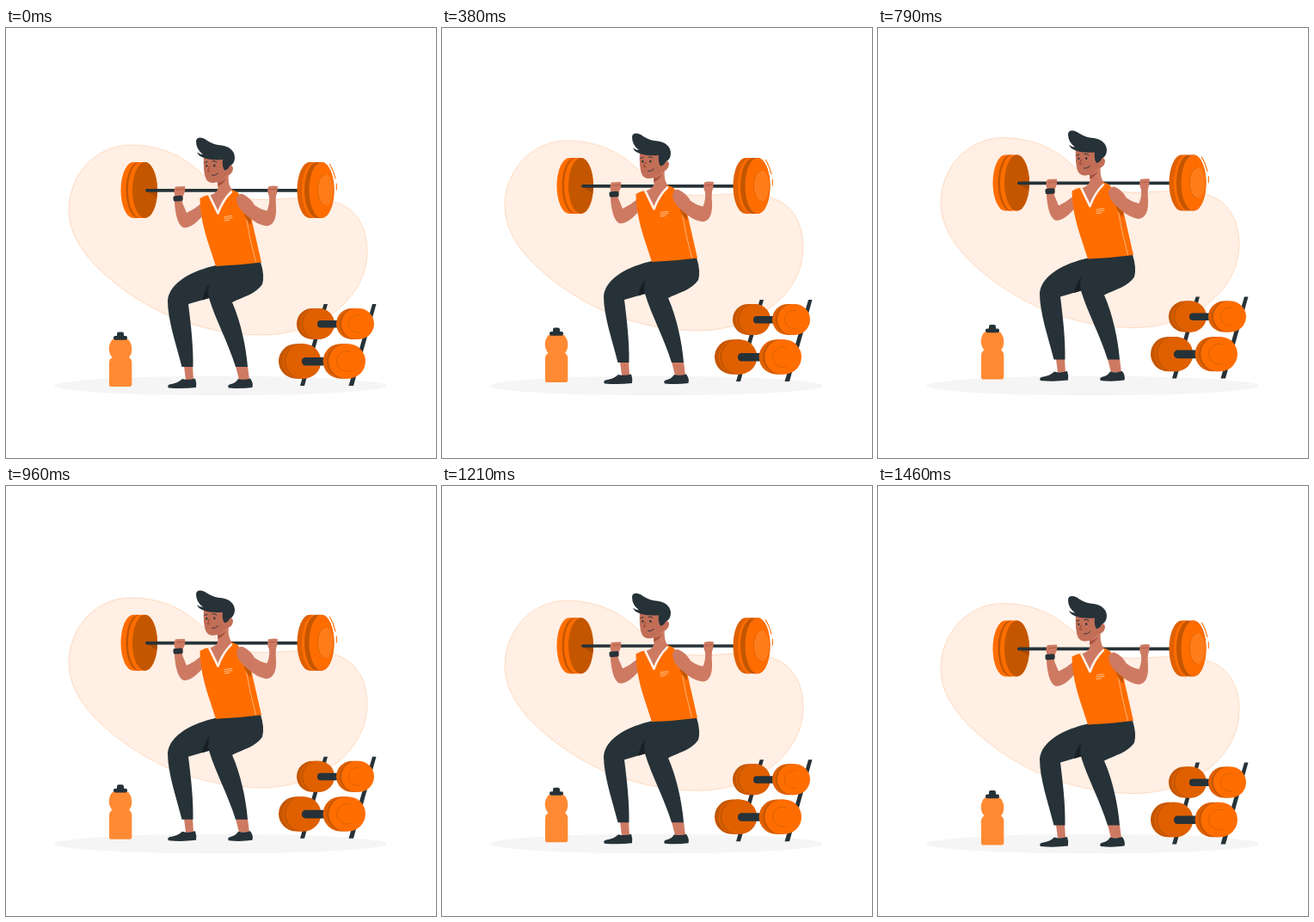
Write an HTML page that moves like this. It is 500 px wide and 500 px high and loops after 1500 ms.

```html
<!DOCTYPE html>
<html lang="en">
<head>
<meta charset="utf-8">
<title>Squat</title>
<style>
  html, body { margin: 0; height: 100%; overflow: hidden; background: #fff; }
  svg { display: block; width: 100%; height: 100%; }
  .dark { fill: #263238; }
  .orange { fill: #ff6d00; }
  .rim { fill: #e06000; }
  .shade { fill: #c45600; }
  .skin { fill: #ce7a63; }
  .line { fill: none; stroke-linecap: round; stroke-linejoin: round; }
</style>
</head>
<body>
<svg viewBox="0 0 500 500">
  <defs>
    <g id="dumbbell">
      <rect class="shade" width="37" height="36" rx="18"/>
      <rect class="rim" x="4" width="37" height="36" rx="18"/>
      <rect class="shade" x="5.500" width="37" height="36" rx="18"/>
      <rect class="rim" x="7.500" width="36.500" height="36" rx="18"/>
      <rect class="dark" x="24" y="14" width="28" height="8.500" rx="4"/>
      <rect class="rim" x="46" width="37" height="36" rx="18"/>
      <rect class="shade" x="50" width="37" height="36" rx="18"/>
      <rect class="orange" x="52" width="38" height="36" rx="18"/>
      <path class="line" d="M74 8A10.500 10.500 0 1 0 74 28" stroke="#d86000" stroke-width=".8"/>
    </g>
  </defs>

  <ellipse cx="249.500" cy="416" rx="193.500" ry="11.300" fill="#f5f5f5"/>

  <g id="scene">
    <path fill="#ffefe4" stroke="#ff6d00" stroke-width=".2" d="M145 136C105 136 73 170 73 212C73 251 108 286 151 314C190 340 245 357 297 357C365 357 420 314 420 260C420 232 408 211 385 203C350 192 320 202 285 199C250 196 232 169 207 153C190 142 168 136 145 136Z"/>

    <g id="rack">
      <path class="dark" d="M369.500 321H374L347 416H342ZM426 321H430.500L404 416H398.500Z"/>
      <use href="#dumbbell" x="338" y="326"/>
      <use href="#dumbbell" transform="translate(317 367.300) scale(1.122)"/>
    </g>

    <g id="bottle">
      <path fill="#ff8a33" d="M124 362H142Q146.500 367 146.300 374Q146 380 143 383Q146.300 385 146.300 389V415Q146 417 144 417H122Q120 417 120 415V389Q120 385 123.500 383Q120 379 119.700 373Q120 366 124 362Z"/>
      <rect class="dark" x="125" y="358" width="16" height="4.700" rx="2"/>
      <rect class="dark" x="129" y="353.500" width="8" height="7" rx="2"/>
    </g>

    <g id="barbell">
      <rect class="orange" x="133.500" y="156" width="35" height="65" rx="14.500" ry="32.500"/>
      <ellipse class="shade" cx="154" cy="188.500" rx="14.500" ry="32.500"/>
      <rect class="orange" x="142" y="156" width="34" height="65" rx="14.500" ry="32.500"/>
      <ellipse class="shade" cx="161.500" cy="188.500" rx="14.500" ry="32.500"/>
      <path fill="#a84a00" d="M163 189H176L175 197Z"/>
      <rect class="dark" x="162" y="187" width="180" height="3.700" rx="1.800"/>
      <rect class="rim" x="338.500" y="156" width="34" height="65" rx="14.500" ry="32.500"/>
      <ellipse class="orange" cx="358.500" cy="188.500" rx="14.500" ry="32.500"/>
      <rect class="shade" x="347" y="156" width="34.500" height="65" rx="14.500" ry="32.500"/>
      <ellipse class="orange" cx="367" cy="188.500" rx="14.500" ry="32.500"/>
      <ellipse cx="371.500" cy="188.500" rx="9" ry="18" fill="#ff7c1a"/>
      <path class="line" d="M371 170.500C359.500 173 359.500 204 371 206.500" stroke="#d86000" stroke-width=".8"/>
      <path class="line" d="M376.500 158.500Q381 166 383 175M384.300 181V188" stroke="#ff6d00" stroke-width="1.100"/>
    </g>

    <g id="man">
      <path class="skin" d="M207 393H217L218 409H209ZM267 393H281L283 409H271Z"/>
      <g class="dark">
        <path d="M205 408Q212 410 220 407.500Q222 413 221 418Q205 420 189 418.500Q187 416 190 414.500Q200 413 205 408Z"/>
        <path d="M270 408Q277 410 284 407.500Q288 413 286.500 418Q273 420 259 418.500Q257 416 260 414.500Q267 413 270 408Z"/>
        <path d="M244 276L296 272Q301 288 298 298C291 309 275 313 263 319C273 342 279 370 281 394H267C258 365 244 340 236 314L212 321C215 345 218 370 217.500 394H204.500C198 368 188 340 188 317C190 295 218 282 244 276Z"/>
      </g>
      <path fill="#182025" d="M228 316.500Q231 303 237 297Q234 305 236 314Z"/>

      <path class="skin" d="M197 184.500L208 184Q209 190 206 195L205 203L210 215Q219 211 227 204L229 218Q215 234 206 232Q198 228 196 204L197 196Q194 190 197 184.500Z"/>
      <rect class="dark" x="194.500" y="195" width="11" height="6.500" rx="2" transform="rotate(-4 200 198)"/>

      <path class="skin" d="M246 176L259 168Q257 186 266 190L247 215L236 195Q246 192 246.500 186Z"/>
      <path fill="#a9553f" d="M246 179.500Q252 179 256 174Q253 182 246.300 184Z"/>

      <path class="orange" d="M225.500 198Q231 194.500 237 194L247 215L262 188Q268 189 271 193Q270 208 285 220L297 272.500Q270 276 244 277C238 256 226 230 225.500 198Z"/>
      <path class="line" d="M236.500 195L246.500 215.500Q252 200 262 190.500" stroke="#fff3ea" stroke-width="2.600"/>
      <path class="line" d="M254 219.500L263 218.500M254 221.700L263 220.700M254 224L260 223.200" stroke="#ffd2ad" stroke-width=".8"/>
      <path class="line" d="M279 219Q283 245 290.500 272" stroke="#ffc493" stroke-width=".8"/>
      <path class="shade" d="M276 214L285 221V229Q279 224 276 214Z"/>

      <path class="skin" d="M305 184.500Q310 183 316 184L315 192Q313 196 314 208Q315 229 303 230.300Q292 229 281 219Q269 210 268 200Q269 192 275 193Q284 197 289 206Q296 211 303.500 212.500Q307 204 306 196Q303 190 305 184.500Z"/>
      <path class="line" d="M199 188L207 187.500M306 188L314 187.500" stroke="#a9553f" stroke-width=".8"/>

      <path fill="#c26e57" d="M230 149Q229 166 232 174Q234 180 241 180Q250 180 255 172Q263 171 264 164Q264 158 258 160L256 147Z"/>
      <path class="dark" d="M221 132C221 126 229 126.500 234 131Q242 136 251 136.500Q265 139 266 150Q266 158 260 160.500Q258 165 254 165.500Q251 161 252 153Q238 154 230 151Q224 149 222 144.500Q226 147 229 147Q221 141 221 132Z"/>
      <path class="line" d="M231 156.500L234 155.500M240 155Q243 154 245 156" stroke="#263238"/>
      <path class="line" d="M236.500 161L234.500 166.500H237" stroke="#8f3f2c" stroke-width=".9"/>
      <path class="line" d="M239.500 171.500Q244 172 246.500 169" stroke="#263238" stroke-width=".9"/>
      <ellipse class="dark" cx="233.300" cy="160.300" rx="1" ry="1.400"/>
      <ellipse class="dark" cx="242.300" cy="160" rx="1.100" ry="1.500"/>
    </g>
  </g>
</svg>
<script>
  const STEPS = 36, STEP_MS = 1500 / STEPS, LIFT = 10, BASE = 0.5;
  const scene = document.getElementById("scene");

  // Linear rise and fall, drawn at 24 steps per second.
  function draw() {
    const step = Math.floor((performance.now() + 4) / STEP_MS) + 1;
    const phase = (step % STEPS) / STEPS;
    const lift = LIFT * (1 - Math.abs(1 - 2 * phase));
    scene.setAttribute("transform", `translate(0 ${BASE - lift})`);
    requestAnimationFrame(draw);
  }
  draw();
</script>
</body>
</html>
```
